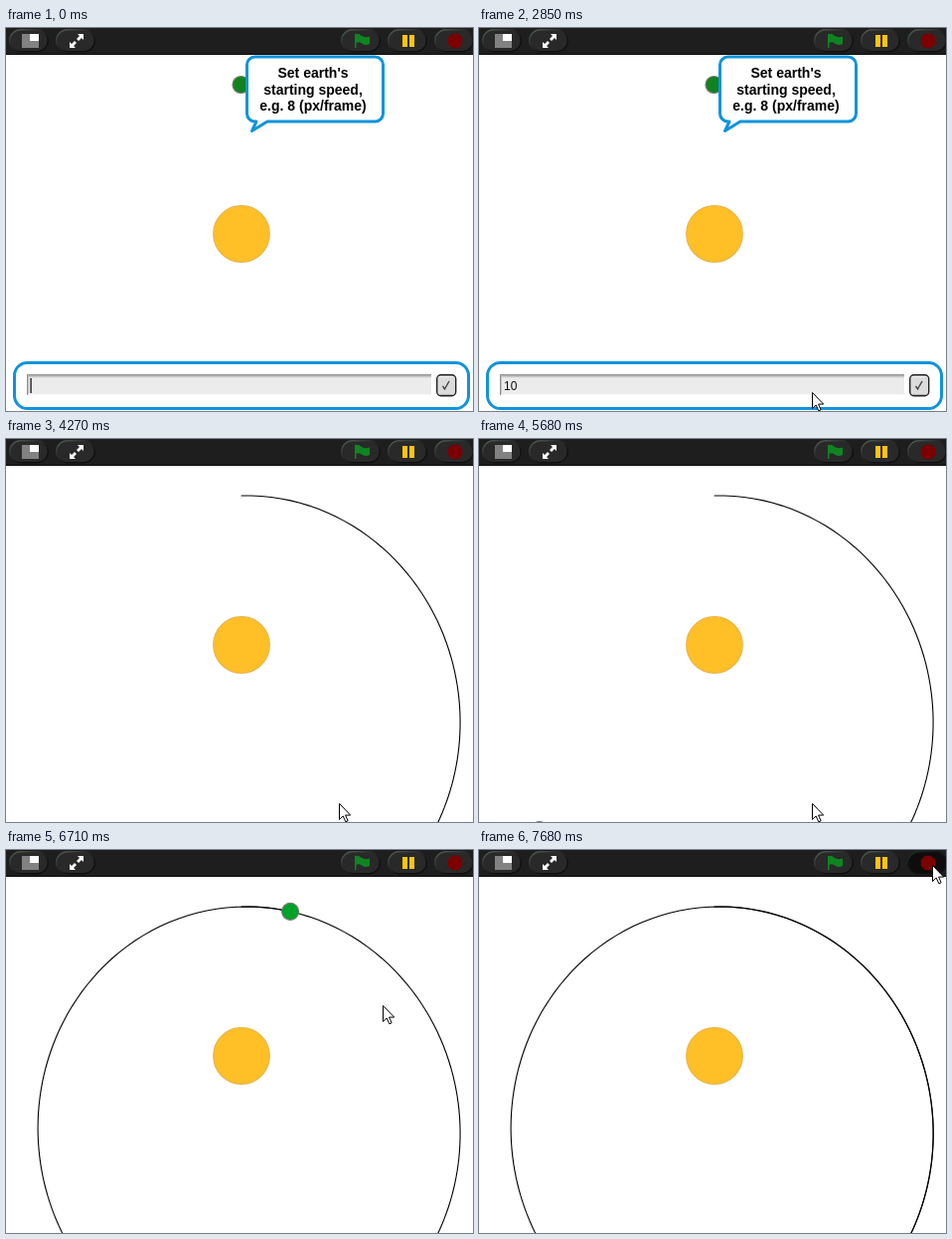
An HTML page with a canvas that plays this animation: 470x385 px, repeating every 8 s.

```html
<!DOCTYPE html>
<html lang="en">
<head>
<meta charset="utf-8">
<title>Orbit</title>
<style>
  html, body { margin: 0; width: 100%; height: 100%; overflow: hidden; background: #fff; }
  canvas { display: block; }
</style>
</head>
<body>
<canvas id="stage" width="470" height="385"></canvas>
<script>
const ctx = document.getElementById('stage').getContext('2d');
const LOOP = 8000, LAUNCH = 3250, TICK = 67.5;
const STEPS_PER_TICK = 4.015, HEAD_START = 0.75;
const SUN = { x: 237, y: 207 }, GM = 11250, BLUE = '#0f94db';

// Orbit: move first, then pull towards the sun
const orbit = (() => {
  let x = 237, y = 57, vx = 10, vy = 0;
  const pts = [[x, y]];
  for (let i = 0; i < 300; i++) {
    x += vx;
    y += vy;
    const dx = SUN.x - x, dy = SUN.y - y, r3 = Math.hypot(dx, dy) ** 3;
    vx += GM * dx / r3;
    vy += GM * dy / r3;
    pts.push([x, y]);
  }
  return pts;
})();

// Pointer path: time, x, y
const POINTER = [
  [190, 344, 378], [400, 341, 366], [780, 336, 366], [6220, 336, 366],
  [6290, 340, 351], [6422, 359, 291], [6560, 371, 214], [6692, 380, 156],
  [6960, 413, 92], [7232, 455, 28], [7360, 457, 17], [7500, 457, 15]
];

function along(keys, t) {
  const i = keys.findIndex(k => k[0] > t);
  if (i < 0) return keys[keys.length - 1].slice(1);
  if (i === 0) return keys[0].slice(1);
  const a = keys[i - 1], b = keys[i], f = (t - a[0]) / (b[0] - a[0]);
  return [a[1] + (b[1] - a[1]) * f, a[2] + (b[2] - a[2]) * f];
}

function rect(color, x, y, w, h) {
  ctx.fillStyle = color;
  ctx.fillRect(x, y, w, h);
}

function paint(fill, stroke, width) {
  if (fill) { ctx.fillStyle = fill; ctx.fill(); }
  if (stroke) { ctx.strokeStyle = stroke; ctx.lineWidth = width; ctx.stroke(); }
}

function disc(x, y, r, fill, stroke) {
  ctx.beginPath();
  ctx.arc(x, y, r, 0, 7);
  paint(fill, stroke, 1.2);
}

function rounded(x, y, w, h, r, fill, stroke, width) {
  ctx.beginPath();
  ctx.roundRect(x, y, w, h, r);
  paint(fill, stroke, width);
}

function poly(pts, fill, stroke, width) {
  ctx.beginPath();
  pts.forEach(p => ctx.lineTo(p[0], p[1]));
  ctx.closePath();
  paint(fill, stroke, width);
}

function pill(x, pressed) {
  const edge = ctx.createLinearGradient(x, 1, x + 12, 25);
  edge.addColorStop(0, pressed ? '#1f3a24' : '#56685a');
  edge.addColorStop(0.5, pressed ? '#141414' : '#2e322f');
  edge.addColorStop(1, '#101010');
  rounded(x + 0.7, 1.7, 38.6, 22, 11, pressed ? '#0d0d0d' : '#292929', edge, 1.4);
}

function toolbar(pressed) {
  rect('#1e1e1e', 0, 0, 470, 26);
  rect('#0b0b0b', 0, 26, 470, 1);
  [3, 50, 337, 384].forEach(x => pill(x, false));
  pill(431, pressed);

  rect('#828282', 16, 6, 17, 14);
  rect('#fff', 24, 6, 9, 7);

  poly([[72, 6], [78, 6], [78, 12], [76, 10], [73, 13], [71, 11], [74, 8]], '#fff');
  poly([[64, 14], [66, 16], [69, 13], [71, 15], [68, 18], [70, 20], [64, 20]], '#fff');

  ctx.beginPath();
  ctx.moveTo(351, 6);
  ctx.quadraticCurveTo(355, 5, 358, 8);
  ctx.quadraticCurveTo(361, 10, 366, 8.5);
  ctx.lineTo(366, 16);
  ctx.quadraticCurveTo(361, 18, 358, 15.5);
  ctx.quadraticCurveTo(355, 13.5, 352.5, 15);
  ctx.lineTo(352.5, 20);
  ctx.lineTo(351, 20);
  ctx.closePath();
  paint('#0f8521');

  rect('#ffc40f', 399, 7, 5, 12);
  rect('#ffc40f', 406, 7, 5, 12);

  const oct = [];
  for (let i = 0; i < 8; i++) {
    const a = (i + 0.5) * Math.PI / 4;
    oct.push([452 + 7.8 * Math.cos(a), 13 + 7.8 * Math.sin(a)]);
  }
  poly(oct, '#7c0000');
}

function bubble() {
  ctx.beginPath();
  ctx.moveTo(252, 94);
  ctx.arcTo(242.5, 94, 242.5, 84, 8);
  ctx.arcTo(242.5, 29, 260, 29, 8);
  ctx.arcTo(379.5, 29, 379.5, 50, 8);
  ctx.arcTo(379.5, 94, 360, 94, 8);
  ctx.lineTo(263, 94);
  ctx.lineTo(247.5, 103.5);
  ctx.closePath();
  ctx.lineJoin = 'round';
  paint('#fff', BLUE, 3);
  ctx.lineJoin = 'miter';
  ctx.fillStyle = '#000';
  ctx.font = 'bold 14px "Liberation Sans", Arial, sans-serif';
  ctx.textAlign = 'center';
  ['Set earth\'s', 'starting speed,', 'e.g. 8 (px/frame)']
    .forEach((s, i) => ctx.fillText(s, 309, 50 + i * 16.5));
}

function prompt(t) {
  rounded(8.5, 336.5, 457, 46, 13, '#fff', BLUE, 3);
  rect('#ececec', 21, 348, 407, 21);
  const shade = ctx.createLinearGradient(0, 348, 0, 352);
  shade.addColorStop(0, '#8a8a8a');
  shade.addColorStop(1, '#ececec');
  rect(shade, 21, 348, 407, 4);
  rect('#8e8e8e', 21, 348, 1, 21);
  rect('#c4c4c4', 22, 349, 1, 20);
  rect('#f8f8f8', 22, 368, 406, 1);

  rounded(433.7, 348.7, 19, 21, 4, '#dcdcdc', '#222', 1.4);
  rect('#f6f6f6', 436, 350, 14, 1);
  rect('#b4b4b4', 436, 368, 14, 1);
  ctx.beginPath();
  ctx.moveTo(439.5, 360);
  ctx.lineTo(441.5, 363);
  ctx.lineTo(446, 355);
  paint(null, '#444', 1.4);

  const text = t < 2590 ? '' : t < 2720 ? '1' : '10';
  ctx.fillStyle = '#111';
  ctx.font = '12px "Liberation Sans", Arial, sans-serif';
  ctx.textAlign = 'left';
  ctx.fillText(text, 25, 364);
  const caretOn = t < 330 || (t >= 810 && t < 1870) || (t >= 2330 && t < 2850);
  if (caretOn) rect('#222', 24.4 + Math.round(ctx.measureText(text).width), 352, 1.4, 15);
}

function trail(n) {
  const i = Math.floor(n), f = n - i, a = orbit[i], b = orbit[i + 1];
  const x = a[0] + (b[0] - a[0]) * f, y = a[1] + (b[1] - a[1]) * f;
  ctx.lineCap = 'round';
  for (let from = 0; from <= i; from += 200) {
    const last = Math.min(i, from + 200);
    ctx.beginPath();
    for (let j = from; j <= last; j++) ctx.lineTo(...orbit[j]);
    if (last === i) ctx.lineTo(x, y);
    paint(null, '#000', 1.1);
  }
  ctx.lineCap = 'butt';
  return [x, y];
}

function pointer(x, y) {
  ctx.save();
  ctx.translate(Math.round(x) - 0.5, Math.round(y) + 0.5);
  poly([[0, 0], [0, 16], [3.7, 12.5], [6.3, 18.3], [8.6, 17.3], [6.1, 11.6], [11.2, 11.6]],
    '#fff', '#000', 1);
  ctx.restore();
}

function draw(t) {
  const tick = Math.floor((t - LAUNCH) / TICK);
  const shown = LAUNCH + tick * TICK;
  const flying = t >= LAUNCH;

  rect('#fff', 0, 0, 470, 385);
  const earth = flying ? trail(HEAD_START + tick * STEPS_PER_TICK) : [236.5, 57];
  disc(SUN.x, SUN.y, 28.3, '#ffbf27', '#e8b64a');
  disc(earth[0], earth[1], 8.5, flying ? '#00a227' : '#11821f', '#6f7a70');
  if (!flying) {
    bubble();
    prompt(t);
  }
  toolbar(t >= 7330);
  if (t >= 190) pointer(...along(POINTER, shown));
}

const begin = performance.now();
function loop() {
  draw((performance.now() - begin) % LOOP);
  requestAnimationFrame(loop);
}
loop();
</script>
</body>
</html>
```
